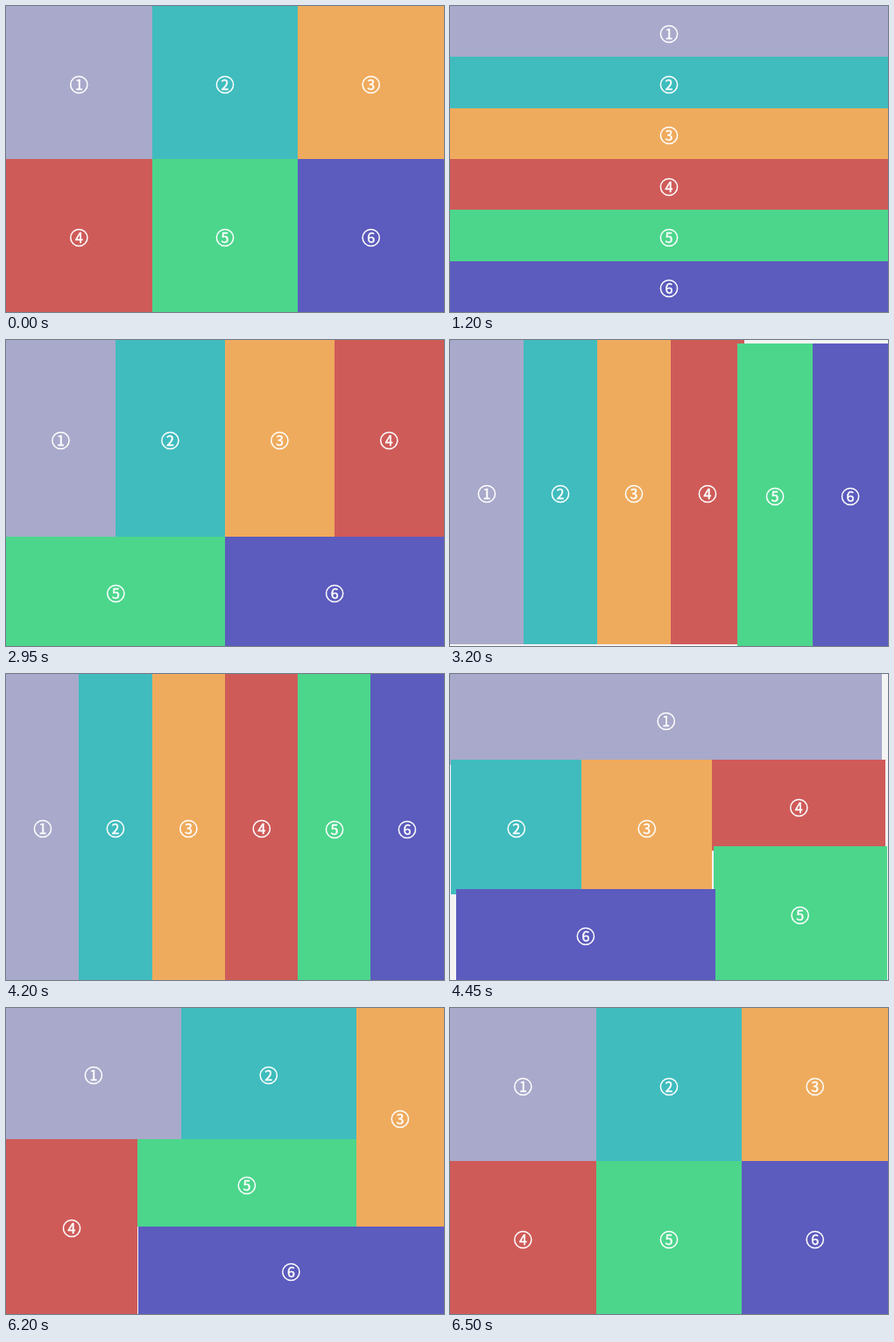
Animation of 500x350 px, one loop 8 s. Source, as an HTML page with a canvas:

```html
<!DOCTYPE html>
<html lang="en">
<head>
<meta charset="utf-8">
<title>Six tile layouts</title>
<style>
  html, body { margin: 0; width: 100%; height: 100%; overflow: hidden; background: #f4f4f4; }
  canvas { display: block; }
</style>
</head>
<body>
<canvas id="stage" width="500" height="350"></canvas>
<script>
const W = 500, H = 350, LOOP = 8000, STEP = 50, DURATION = 300;
const ctx = document.getElementById('stage').getContext('2d');
const colors = ['#a9a9cb', '#40bcbe', '#efab5d', '#cf5b59', '#4cd68c', '#5c5bbe'];

// Each layout is six boxes: [x, y, width, height]
const six = fn => colors.map((_, i) => fn(i));

const grid = six(i => [i % 3 * W / 3, i < 3 ? 0 : H / 2, W / 3, H / 2]);
const rows = six(i => [0, i * H / 6, W, H / 6]);
const fourTwo = six(i => i < 4 ? [i * 125, 0, 125, 225] : [(i - 4) * 250, 225, 250, 125]);
const columns = six(i => [i * W / 6, 0, W / 6, H]);
const banner = [
  [0, 0, 500, 100],
  [0, 100, 150, 150],
  [150, 100, 150, 150],
  [300, 100, 200, 100],
  [300, 200, 200, 150],
  [0, 250, 300, 100]
];
const nested = [
  [0, 0, 200, 150],
  [200, 0, 200, 150],
  [400, 0, 100, 250],
  [0, 150, 150, 200],
  [150, 150, 250, 100],
  [150, 250, 350, 100]
];

const moves = [
  [897, rows], [1947.5, fourTwo], [2949, columns],
  [4199, banner], [5131, nested], [6197, grid]
];

// cubic-bezier(.25, .1, .25, 1)
function ease(x) {
  if (x <= 0) return 0;
  if (x >= 1) return 1;
  const curve = (s, a, b) => 3 * (1 - s) * (1 - s) * s * a + 3 * (1 - s) * s * s * b + s * s * s;
  let lo = 0, hi = 1;
  for (let i = 0; i < 30; i++) {
    const mid = (lo + hi) / 2;
    if (curve(mid, 0.25, 0.25) < x) lo = mid; else hi = mid;
  }
  return curve(lo, 0.1, 1);
}

function layoutAt(time) {
  let boxes = grid;
  for (const [start, next] of moves) {
    if (time < start) break;
    const p = ease((time - start) / DURATION);
    boxes = boxes.map((box, i) => box.map((v, k) => v + (next[i][k] - v) * p));
  }
  return boxes;
}

function drawTile([x, y, w, h], i) {
  const left = Math.round(x), top = Math.round(y);
  ctx.fillStyle = colors[i];
  ctx.fillRect(left, top, Math.round(x + w) - left, Math.round(y + h) - top);

  const cx = x + w / 2, cy = Math.round(y + h / 2 + 2.4);
  ctx.beginPath();
  ctx.arc(cx, cy, 9.6, 0, Math.PI * 2);
  ctx.lineWidth = 1.5;
  ctx.stroke();
  ctx.fillStyle = '#fff';
  ctx.fillText(i + 1, cx, cy + 6);
  ctx.lineWidth = 0.5;
  ctx.strokeText(i + 1, cx, cy + 6);
}

function draw(now) {
  const time = Math.floor(now % LOOP / STEP) * STEP;
  ctx.fillStyle = '#f4f4f4';
  ctx.fillRect(0, 0, W, H);
  ctx.strokeStyle = '#fff';
  ctx.font = '16px "Noto Sans CJK SC", "Noto Sans CJK JP", "Noto Sans", sans-serif';
  ctx.textAlign = 'center';
  ctx.textBaseline = 'alphabetic';
  layoutAt(time).forEach(drawTile);
}

const began = performance.now();
function tick() {
  draw(performance.now() - began);
  requestAnimationFrame(tick);
}
tick();
</script>
</body>
</html>
```
